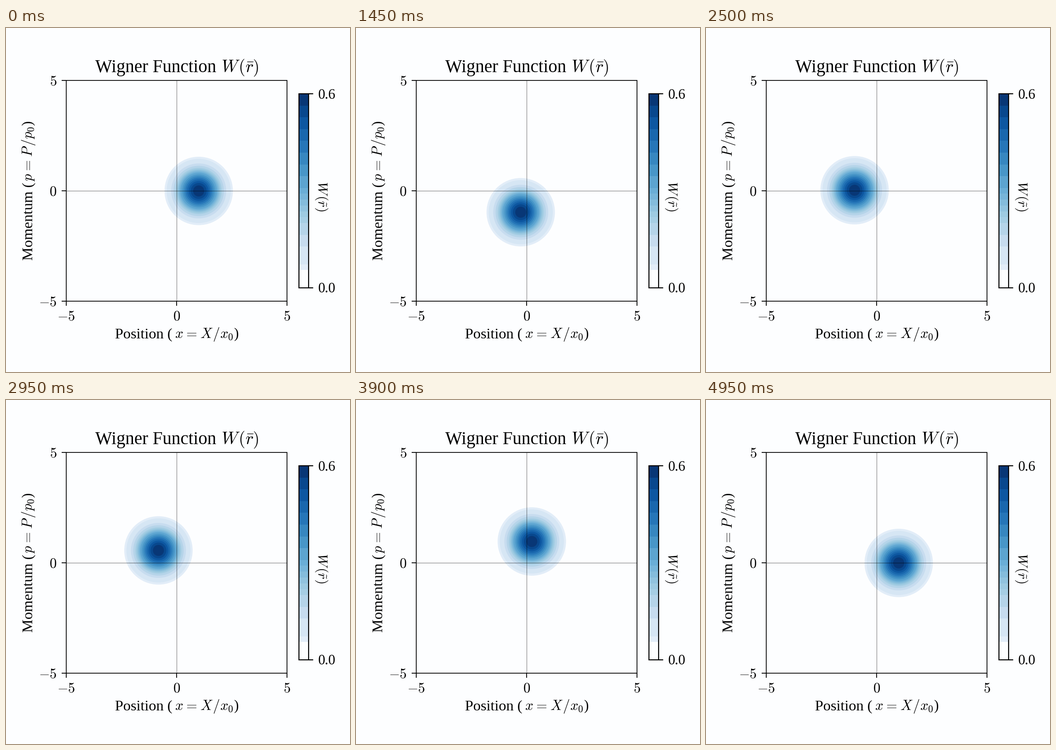
Animation, 748 px wide and 748 px high, one loop 5 s. Source, as a matplotlib script:

```python
import numpy as np
import matplotlib.pyplot as plt
from matplotlib.animation import FuncAnimation
from matplotlib.patches import Circle, Rectangle

plt.rcParams.update({
    "font.family": "Liberation Serif",
    "mathtext.fontset": "cm",
    "toolbar": "None",
})

SIZE = 748
FRAMES = 100
PAPER = "#fdfeff"
UNIT = 48                       # pixels per phase-space unit
CX, CY = 371, 354.3             # origin of phase space
HALF = 5 * UNIT
BAR_X, BAR_W = 637, 21.5
BAR_TOP, BAR_BOTTOM = 143.3, 564.7

# Band edges as fractions of the peak value
EDGES = np.array([3, 4, 7, 9, *range(11, 18), *range(19, 34, 2)]) / 33
BANDS = [(lo, hi, plt.cm.Blues((lo + hi) / 2))
         for lo, hi in zip(EDGES[:-1], EDGES[1:])]

# At 72 dpi one point is one pixel
fig = plt.figure(figsize=(SIZE / 72, SIZE / 72), dpi=72, facecolor=PAPER)
ax = fig.add_axes([0, 0, 1, 1])
ax.set(xlim=(0, SIZE), ylim=(SIZE, 0))
ax.axis("off")


def line(xs, ys, width=1.8, **style):
    ax.plot(xs, ys, color="black", lw=width, solid_capstyle="butt", **style)


def label(x, y, text, size, ha="center", rotation=0):
    ax.text(x, y, text, fontsize=size, ha=ha, va="baseline",
            rotation=rotation, rotation_mode="anchor", zorder=6)


def frame(x, y, w, h, width):
    ax.add_patch(Rectangle((x, y), w, h, fill=False, ec="black",
                           lw=width, joinstyle="miter", zorder=5))


def draw_plot():
    left, right = CX - HALF, CX + HALF
    top, bottom = CY - HALF, CY + HALF
    line([left, right], [CY, CY], 1.1, alpha=0.5, zorder=4)
    line([CX, CX], [top, bottom], 1.1, alpha=0.5, zorder=4)
    frame(left, top, 2 * HALF, 2 * HALF, 1.7)
    for value in (-5, 0, 5):
        x, y = CX + value * UNIT, CY - value * UNIT
        line([x, x], [bottom, bottom + 10])
        line([left - 10, left], [y, y])
        label(x, 636, f"${value}$", 30.5)
        label(110.5, y + 10, f"${value}$", 30.5, ha="right")


def draw_colorbar():
    height = BAR_BOTTOM - BAR_TOP
    for lo, hi, color in BANDS:
        ax.add_patch(Rectangle((BAR_X, BAR_BOTTOM - hi * height), BAR_W,
                               (hi - lo) * height, fc=color, lw=0))
    frame(BAR_X, BAR_TOP, BAR_W, height, 2.2)
    for y, text in ((BAR_TOP, "0.6"), (BAR_BOTTOM, "0.0")):
        line([BAR_X + BAR_W, BAR_X + BAR_W + 10], [y, y], 2.2)
        label(678.5, y + 10.5, text, 30.5, ha="left")


def draw_titles():
    equals = r"\hspace{0.06}=\hspace{0.06}"
    # Words run from the start of each line, the formula up to its end
    label(194.5, 96, "Wigner Function", 38.9, ha="left")
    label(550, 96, r"$W\hspace{0.08}(\bar{r})$", 37.2, ha="right")
    label(237.5, 674, "Position (", 32.3, ha="left")
    label(506, 674, rf"$x{equals}X\hspace{{0.08}}/x_0$)", 30.7, ha="right")
    label(57, 504.5, "Momentum (", 32.3, ha="left", rotation=90)
    label(57, 201.5, rf"$p{equals}P\hspace{{0.14}}/p_0$)", 30.7,
          ha="right", rotation=90)
    label(678, 366, r"$W\hspace{0.08}(\tilde{r})$", 29.7, rotation=270)


draw_plot()
draw_colorbar()
draw_titles()

# A Gaussian's level sets are circles: exp(-r^2) = level
rings = [ax.add_patch(Circle((CX, CY), UNIT * np.sqrt(-np.log(lo)),
                             fc=color, lw=0, zorder=2))
         for lo, _, color in BANDS]


def update(i):
    angle = 2 * np.pi * i / (FRAMES - 1)
    center = CX + UNIT * np.cos(angle), CY + UNIT * np.sin(angle)
    for ring in rings:
        ring.center = center
    return rings


anim = FuncAnimation(fig, update, frames=FRAMES, interval=50,
                     repeat=True, repeat_delay=0, blit=False)
plt.show()
```
